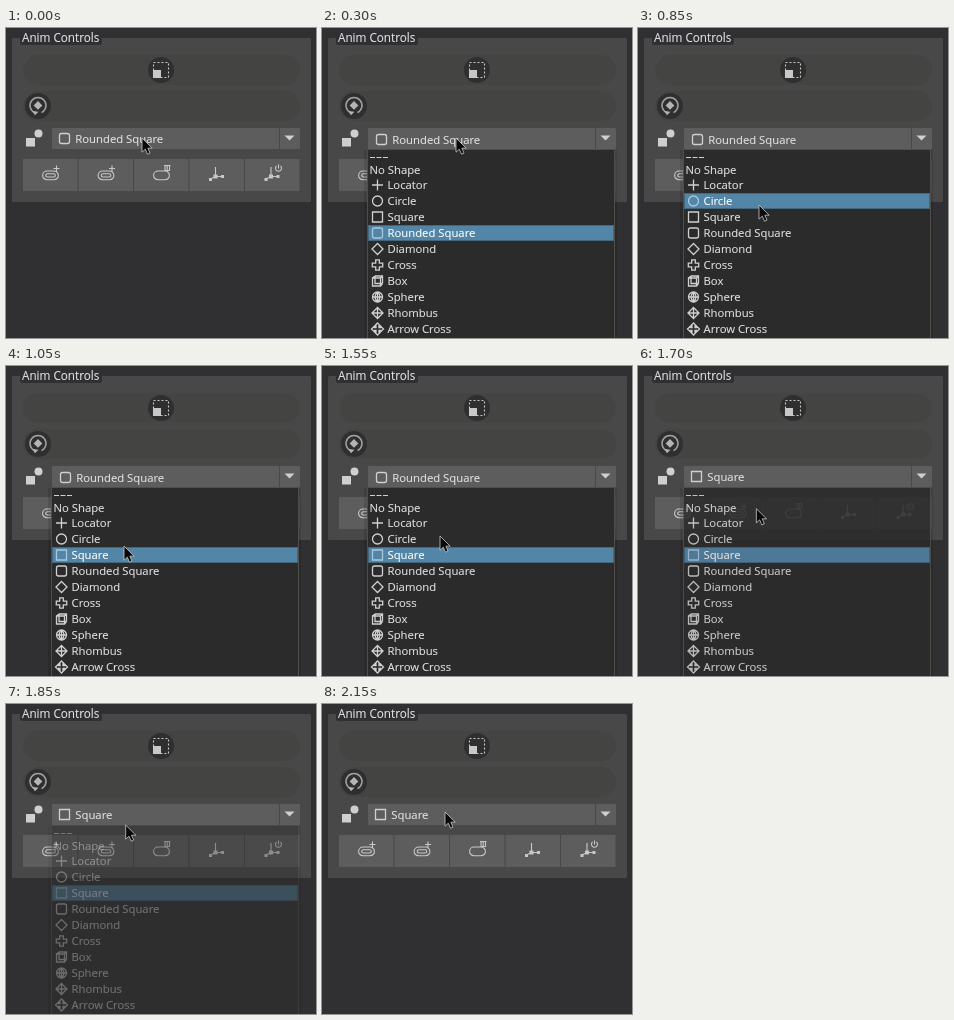
These frames come from a looping animation (310 by 310 pixels, 2.25 s). An HTML page:

```html
<!DOCTYPE html>
<html lang="en">
<head>
<meta charset="utf-8">
<title>Anim Controls</title>
<style>
html, body { margin: 0; width: 100%; height: 100%; overflow: hidden; background: #303032; }
svg { display: block; width: 100vw; height: 100vh; }
text { font: 500 11.3px "Open Sans", "Noto Sans", sans-serif; fill: #e2e2e2; stroke: #e2e2e2; stroke-width: .12; }
.line { fill: none; stroke: #d0d0d0; stroke-width: 1.3; }
.thin { stroke: #c8c8c8; stroke-width: 1.1; }
.on .line { stroke: #a9c8dc; }
.on text { fill: #fff; stroke: #fff; }
</style>
</head>
<body>
<svg viewBox="0 0 310 310">
  <rect width="310" height="310" fill="#303032"/>
  <rect x="6" y="10" width="299" height="164" rx="1.5" fill="#484848"/>
  <rect x="14" y="3" width="82" height="14" rx="2" fill="#303032"/>
  <text x="16" y="14" style="font-size:11.7px">Anim Controls</text>

  <g fill="#444442">
    <rect x="17" y="27" width="277" height="30" rx="15"/>
    <rect x="17" y="63" width="277" height="30" rx="15"/>
  </g>
  <g fill="#2f2f2f"><circle cx="155" cy="42" r="13"/><circle cx="32" cy="78" r="13"/></g>
  <rect x="147.5" y="34.5" width="15" height="15" class="line thin" stroke-dasharray="2 2"/>
  <rect x="147" y="42" width="8" height="8" fill="#c8c8c8"/>
  <path d="M28.5 84.6A8 8 0 1 1 35.5 84.6" fill="none" stroke="#a2a2a2" stroke-width="1.5"/>
  <path d="M32 73l4.4 4.4-4.4 4.4-4.4-4.4zM26.5 83l6 .8-3.6 3.4z" fill="#b4b4b4"/>

  <g fill="#cfcfcf"><rect x="20" y="110" width="9" height="8.5"/><circle cx="32.5" cy="105.5" r="4"/></g>
  <rect x="46" y="100" width="248" height="21" rx="1" fill="#5d5d5d"/>
  <path d="M273.5 100V121" stroke="#494949"/>
  <path d="M278.5 107.5h10l-5 5z" fill="#d0d0d0"/>
  <g id="combo"></g>
  <g id="buttons"></g>

  <g id="menu">
    <rect x="42" y="122" width="253" height="200" fill="#000" opacity=".12"/>
    <rect x="45.5" y="121.5" width="247" height="200" fill="#2b2b2b" stroke="#504e49"/>
    <rect id="hover" x="46.5" width="245" height="15" fill="#5285a6" stroke="#416781"/>
    <path d="M48 129.5h18" stroke="#d0d0d0" stroke-dasharray="5 1.5"/>
    <text x="47.5" y="146">No Shape</text>
    <g id="items"></g>
  </g>
  <path id="cursor" d="M0 0V14.2L3.3 11.2L5.5 16.2L8 15.1L5.9 10.2H10.2Z" fill="#0a0a0a" stroke="#c8c8c8" stroke-width=".8"/>
</svg>
<script>
const $ = id => document.getElementById(id);
const LOOP = 2250, TICK = 50;

// Shape icons, centred on 0,0
const cross = 'M-1.8-5.2h3.6v3.4h3.4v3.6h-3.4v3.4h-3.6v-3.4h-3.4v-3.6h3.4z';
const ring = 'M-5 0a5 5 0 1 0 10 0a5 5 0 1 0-10 0';
const rounded = 'M-3-5h6q2 0 2 2v6q0 2-2 2h-6q-2 0-2-2v-6q0-2 2-2z';
const shapes = [
  ['Locator', 'M-5.5 0h11M0-5.5v11'],
  ['Circle', ring],
  ['Square', 'M-5-5h10v10h-10z'],
  ['Rounded Square', rounded],
  ['Diamond', 'M0-5.5L5.5 0L0 5.5L-5.5 0z'],
  ['Cross', cross],
  ['Box', 'M-5-3h8v8h-8zM-2.5-5h7.5v7.5M-5-3l2.5-2M3-3l2-2M3 5l2-2.5M-2.5-5v7.5h7.5'],
  ['Sphere', ring + 'M-5 0h10M0-5v10M0-5q-5 5 0 10q5-5 0-10'],
  ['Rhombus', 'M0-5.5L5.5 0L0 5.5L-5.5 0zM-5.5 0h11M0-5.5v11'],
  ['Arrow Cross', 'M0-6l3 3h-1.5v1.5h1.5v-1.5l3 3l-3 3v-1.5h-1.5v1.5h1.5l-3 3l-3-3h1.5v-1.5h-1.5v1.5l-3-3l3-3v1.5h1.5v-1.5h-1.5z']
];
const SQUARE = 2, ROUNDED = 3;
const entry = ([name, d], x, y, gap = 10) =>
  `<g><path class="line" transform="translate(${x} ${y})" d="${d}"/><text x="${x + gap}" y="${y + 4}">${name}</text></g>`;

$('items').innerHTML = shapes.map((s, i) => entry(s, 55.5, 157 + 16 * i)).join('');
const rows = [...$('items').children];

// Tool buttons, icons centred on 0,0
const link = 'M-3.5-4h7a4.4 4.4 0 0 1 0 8.8h-7a4.4 4.4 0 0 1 0-8.8z';
const add = link + 'M-3.2-1.2h6.4a1.6 1.6 0 0 1 0 3.2h-6.4a1.6 1.6 0 0 1 0-3.2zM3-6.5h6M6-9.5v6';
const axes = 'M-1.5-8v9.5l-6 3M-1.5 1.5h7';
const tools = [
  add, add,
  link + 'M2.5-9.5h6.5M3.5-9.5v5h4.5v-5M5.7-9v4',
  axes,
  axes + 'M4-9a3 3 0 1 0 4 0M6-10.5v4'
];
$('buttons').innerHTML = tools.map((d, i) => {
  const x = 17 + 55.5 * i;
  const hub = i > 2 ? '<path d="M-3.5-.5h4v4h-4zM-8 3h3v3h-3zM4 0h3v3h-3z" fill="#c8c8c8"/>' : '';
  return `<rect x="${x}" y="131" width="54.5" height="32" fill="#5d5d5d"/>
    <g transform="translate(${x + 27.5} 147)"><path class="line thin" d="${d}"/>${hub}</g>`;
}).join('');

// Pointer stops: time, x, y, and whether it glides to the next stop
const path = [
  [0, 136, 110], [50, 134, 110],
  [750, 132, 124, 1], [800, 126, 154, 1], [850, 121, 177, 1], [950, 118, 184, 1], [1050, 118, 180],
  [1550, 118, 170, 1], [1650, 118, 151, 1], [1800, 119, 126, 1], [1950, 121, 111, 1], [2050, 122, 108],
  [2150, 123, 108]
];

function pointer(t) {
  const i = path.findLastIndex(p => p[0] <= t);
  const [t0, x, y, glide] = path[i];
  if (!glide) return [x, y];
  const [t1, x1, y1] = path[i + 1], k = (t - t0) / (t1 - t0);
  return [x + (x1 - x) * k, y + (y1 - y) * k];
}

function hovered(t, y) {
  if (t < 750) return ROUNDED;
  if (t >= 1050) return SQUARE;
  return Math.floor((y - 149) / 16);
}

let shown = '';
function setCombo(pick, sunk) {
  const key = pick + '/' + sunk;
  if (key === shown) return;
  shown = key;
  $('combo').innerHTML = entry(shapes[pick], 58.5, 110.5, 10.8);
  $('combo').setAttribute('transform', `translate(${sunk} ${sunk})`);
}

function draw(time) {
  const t = Math.floor(time % LOOP / TICK) * TICK;
  const [x, y] = pointer(t);
  const row = hovered(t, y);
  const fade = t < 300 ? 0 : Math.min(1, Math.max(0, (1960 - t) / 300));
  const closing = t >= 1600;
  $('cursor').setAttribute('transform', `translate(${x} ${y})`);
  $('menu').setAttribute('opacity', fade);
  $('hover').setAttribute('y', 149.5 + 16 * row);
  rows.forEach((r, i) => r.classList.toggle('on', i === row));
  setCombo(closing ? SQUARE : ROUNDED, t >= 300 && !closing ? 1 : 0);
}

const start = performance.now();
function frame() {
  draw(performance.now() - start);
  requestAnimationFrame(frame);
}
draw(0);
frame();
</script>
</body>
</html>
```
